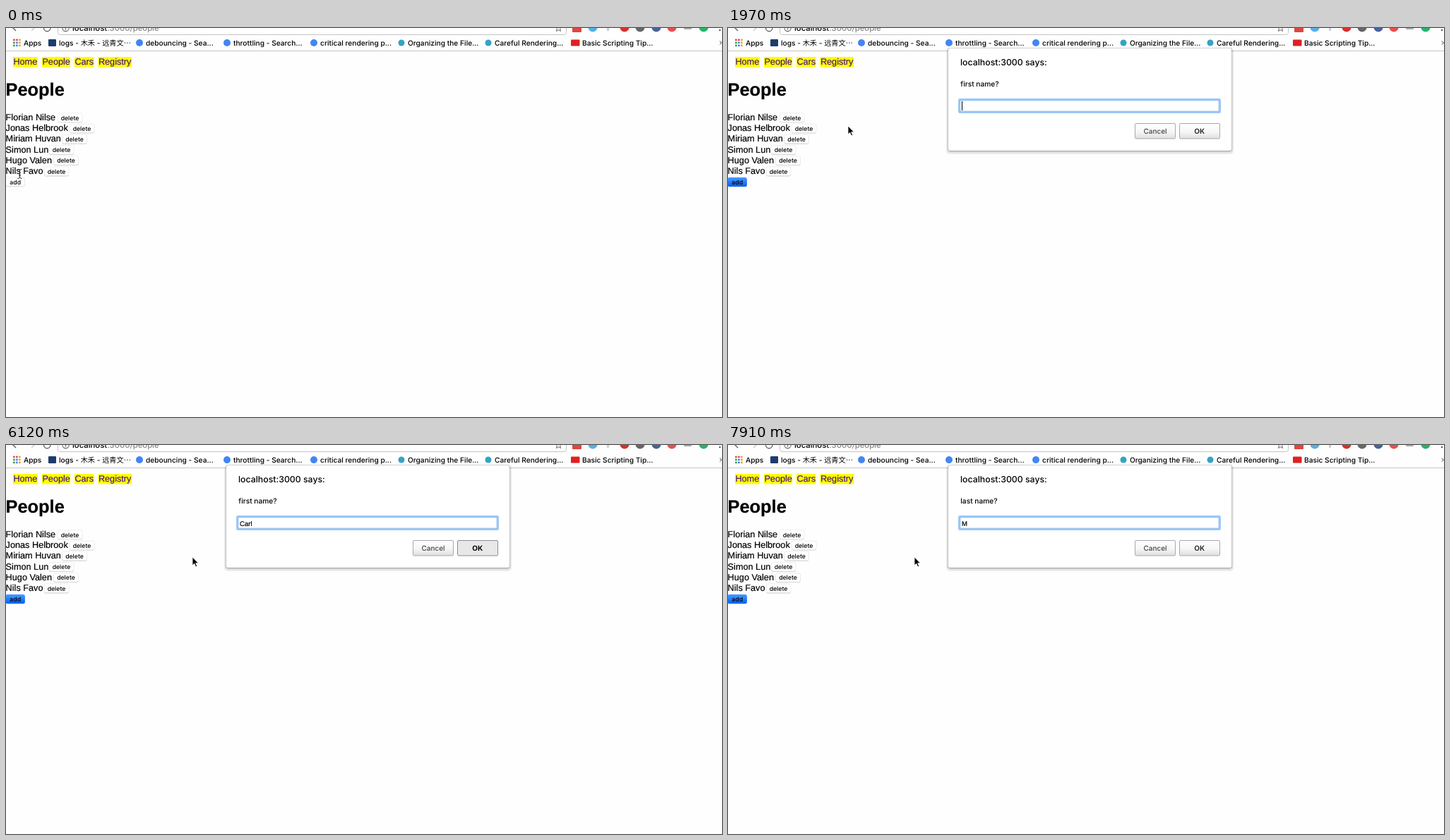
Animation, 1014 px wide and 552 px high, one loop 8 s. Source, as an HTML page:

```html
<!DOCTYPE html>
<html lang="en">
<head>
<meta charset="utf-8">
<title>People</title>
<style>
  html, body { margin: 0; width: 100%; height: 100%; overflow: hidden; background: #fefefe; }
  #stage { position: relative; width: 1014px; height: 552px; overflow: hidden; }
  svg { position: absolute; left: 0; top: 0; display: block; overflow: visible; }
  text {
    font-family: "Liberation Sans", Arial, sans-serif; font-size: 12.7px; white-space: pre;
    stroke: #000; stroke-width: .2px; text-rendering: geometricPrecision;
  }
  .ui {
    font-family: Inter, "Noto Sans CJK SC", "Noto Sans CJK", sans-serif;
    font-size: 10.2px; stroke: none; font-weight: 450;
  }
  .small { font-size: 8.7px; }
  .mid { text-anchor: middle; }
  #nav text { fill: #4a1580; stroke: #4a1580; }
  #dialog {
    position: absolute; left: 312px; top: 29px; width: 401px; height: 145px;
    background: #fff; border-radius: 2px; transform-origin: 50% 100%;
    box-shadow: 0 0 1px rgba(0,0,0,.5), 0 1px 3px rgba(0,0,0,.35), 0 2px 0 3px rgba(0,0,0,.07);
  }
  #dialog .plain { display: none; }
  #dialog.opening {
    background: #fcfcfc; opacity: .95;
    transform: translateY(var(--lift)) perspective(750px) rotateX(6deg) scaleY(1.02);
    box-shadow: 0 0 1px rgba(0,0,0,.4), 0 1px 3px rgba(0,0,0,.3), 0 2px 0 2px rgba(0,0,0,.06);
  }
  .opening .ring { display: none; }
  #dialog.opening .plain { display: inline; }
  .opening text { fill: #303030; }
  .opening .btn text { fill: #777; font-weight: 450; }
  .btn rect { fill: url(#grey); stroke: #a8a8a8; }
  .btn text { font-size: 10px; fill: #444; }
  .btn .ok { font-weight: 700; fill: #333; }
  .pressed rect { fill: #e8e8e8; stroke: #8c8c8c; }
  .pressed .ok { fill: #000; }
  #add.active rect { fill: url(#blue); stroke: none; }
</style>
</head>
<body>
<div id="stage">
  <svg width="1014" height="552">
    <defs>
      <linearGradient id="grey" x2="0" y2="1">
        <stop stop-color="#fff"/><stop offset=".55" stop-color="#f6f6f6"/><stop offset="1" stop-color="#dedede"/>
      </linearGradient>
      <linearGradient id="blue" x2="0" y2="1">
        <stop stop-color="#4a9cff"/><stop offset="1" stop-color="#0a60f2"/>
      </linearGradient>
    </defs>

    <g fill="none" stroke="#666" stroke-width="1.4">
      <path d="M14 4L9 -1"/>
      <path d="M36 4l5-5" stroke="#ccc"/>
      <path d="M53.5 0a4.7 4.7 0 0 0 9.4 0"/>
      <rect x="73.5" y="-14" width="720" height="23.5" rx="3" stroke="#c4c4c4" stroke-width="1"/>
      <circle cx="84.5" cy="0" r="4.6" stroke-width="1.1"/>
      <path d="M84.5 -1v3.5" stroke-width="1.2"/>
      <path d="M779.5 4.5l.8-3.8-2.8-2.7M785.5 4.5l-.8-3.8 2.8-2.7M779.5 4.5l3-1.8 3 1.8" stroke-width="1"/>
    </g>
    <text class="ui" x="94" y="3.5" style="font-size:11.3px">localhost<tspan fill="#888">:3000/people</tspan></text>
    <g id="extensions"></g>
    <g id="bookmarks"></g>
    <path d="M1011 18.5l2.3 2.5-2.3 2.5" fill="none" stroke="#333"/>
    <path d="M0 32.5H1014" stroke="#c6c6c6"/>

    <g id="nav"></g>
    <text x="-.5" y="96" font-weight="700" style="font-size:25.4px">People</text>
    <g id="people"></g>
  </svg>

  <div id="dialog">
    <svg width="401" height="145" viewBox="312 29 401 145">
      <text class="ui" x="329" y="52.5" style="font-size:12.3px">localhost:3000 says:</text>
      <text class="ui" id="question" x="329.3" y="83"></text>
      <rect class="ring" x="327.5" y="101.5" width="369" height="18" rx="1" fill="#fff" stroke="#9cc8f8" stroke-width="3"/>
      <rect class="ring" x="329" y="103" width="366" height="15" fill="none" stroke="#86b4ea" stroke-width=".6"/>
      <rect class="plain" x="328.5" y="102.5" width="367" height="17" fill="#fff" stroke="#dadada"/>
      <text id="typed" x="331" y="114.5" style="font-size:9.6px"></text>
      <rect id="caret" y="104" width="1" height="13"/>
      <g class="btn">
        <rect x="576.5" y="135.5" width="57" height="21.5" rx="1.5"/>
        <text class="ui mid" x="605" y="150.2">Cancel</text>
      </g>
      <g class="btn" id="ok">
        <rect x="639.5" y="135.5" width="57" height="21.5" rx="1.5"/>
        <text class="ui mid ok" x="667.7" y="150.2">OK</text>
      </g>
    </svg>
  </div>

  <svg width="1014" height="552">
    <path id="arrow" d="M0 0V11.8L2.7 9.3L4.7 13.8L6.6 13L4.7 8.7H8.4Z" stroke="#fff" stroke-width=".8"/>
    <path id="beam" d="M-3 -6.5q2.5 0 3 1.5q.5-1.5 3-1.5M0 -5V5M-3 6.5q2.5 0 3-1.5q.5 1.5 3 1.5M-1.5 2H1.5" fill="none" stroke="#222"/>
  </svg>
</div>

<script>
const $ = id => document.getElementById(id);
const fill = (id, items, draw) => { $(id).innerHTML = items.map(draw).join(""); };
const dot = (x, y, r, color) => `<circle cx="${x}" cy="${y}" r="${r}" fill="${color}"/>`;
const square = (x, y, w, h, color) => `<rect x="${x}" y="${y}" width="${w}" height="${h}" rx="1" fill="${color}"/>`;

fill("extensions", [
  [831, "#58aee6"], [876, "#d8302a"], [898, "#666"],
  [921, "#46639f"], [943, "#e84e50"], [988, "#27b36a"]
], ([x, color]) => dot(x, -1, 6.5, color));
$("extensions").innerHTML += square(802, -7, 13, 13, "#df4640") + square(851, -5, 3, 9, "#ccc") +
  square(960, -4, 11, 6, "#aaa") + dot(1011, 3, 1.2, "#555");

const gridColors = ["#e34b3d", "#e34b3d", "#e9a52d", "#35a15a", "#4587e8", "#e9a52d", "#35a15a", "#4587e8", "#e9a52d"];
const grid = gridColors.map((c, i) => square(10 + i % 3 * 4, 15.5 + Math.floor(i / 3) * 4, 2.8, 2.8, c)).join("");
const search = x => dot(x, 21, 5, "#4285f4");
const docs = x => dot(x, 21, 4.5, "#35a3c4");
fill("bookmarks", [
  [25, "Apps", grid],
  [75, "logs - 木禾 - 远青文⋯", square(60, 16, 11, 10, "#1d3c6e")],
  [198, "debouncing - Sea...", search(189)],
  [322, "throttling - Search...", search(313)],
  [445, "critical rendering p...", search(436)],
  [569, "Organizing the File...", docs(560)],
  [692, "Careful Rendering...", docs(683)],
  [816, "Basic Scripting Tip...", square(800, 16.5, 12.5, 9, "#e02020")]
], ([x, label, icon]) => `${icon}<text class="ui" x="${x}" y="24.7">${label}</text>`);

fill("nav", [[10, 35, "Home"], [51, 40, "People"], [97, 27.5, "Cars"], [130.5, 47.5, "Registry"]],
  ([x, w, label]) => `<rect x="${x}" y="41" width="${w}" height="14.5" fill="#ff0"/>
    <text x="${x + .4}" y="52.3">${label}</text>`);

const button = (x, y, w, label, id) => `<g id="${id}">
  <rect x="${x}" y="${y + .8}" width="${w}" height="12.6" rx="2.5" fill="#c9c9c9"/>
  <rect x="${x}" y="${y}" width="${w}" height="12.6" rx="2.5" fill="#fff" stroke="#e6e6e6" stroke-width=".7"/>
  <text class="ui small mid" x="${x + w / 2}" y="${y + 9.7}">${label}</text></g>`;

fill("people", [
  ["Florian Nilse", 73], ["Jonas Helbrook", 90], ["Miriam Huvan", 79.5],
  ["Simon Lun", 61], ["Hugo Valen", 67.5], ["Nils Favo", 54]
], ([name, x], i) => {
  const y = 120.8 + i * 15.24;
  return `<text x="-.4" y="${y + 10}">${name}</text>` + button(x, y, 35, "delete", "delete" + i);
});
$("people").innerHTML += button(-.3, 211.9, 27, "add", "add");

// Each track holds [start time in ms, value...]; the latest started entry applies.
const pointer = [
  [0, 19.5, 207], [150, 66, 207], [930, 52, 221], [1080, 36, 226], [1230, 21, 223],
  [1380, 13.5, 219], [1830, 34, 200], [1970, 170, 139], [2120, 245, 156], [2260, 264, 159]
];
const dialogs = [
  [0, "hidden"], [1830, "opening", "first", -4], [1970, "open", "first"],
  [6270, "hidden"], [6570, "opening", "last", -4.5], [6710, "open", "last"]
];
const typing = [
  [0, "", false], [1970, "", true], [2260, "", false], [2860, "", true],
  [3310, "K", true], [3610, "Ka", true], [3750, "Kay", true], [4350, "Kay", false],
  [4500, "Ka", true], [4950, "K", true], [5090, "", true],
  [5390, "C", true], [5540, "Ca", true], [5680, "Carl", true], [6120, "Carl", false],
  [6270, "", false], [6710, "", true], [7160, "", false], [7310, "M", true], [7910, "M", false]
];
const at = (track, t) => track.findLast(entry => entry[0] <= t).slice(1);

function render(t) {
  const [x, y] = at(pointer, t);
  const overText = t < 150;
  $("beam").style.display = overText ? "" : "none";
  $("arrow").style.display = overText ? "none" : "";
  for (const id of ["beam", "arrow"]) $(id).setAttribute("transform", `translate(${x} ${y})`);

  const [state, which, lift = 0] = at(dialogs, t);
  $("dialog").style.display = state === "hidden" ? "none" : "";
  $("dialog").className = state;
  $("dialog").style.setProperty("--lift", lift + "px");
  $("question").textContent = which ? which + " name?" : "";

  const [text, caretOn] = at(typing, t);
  $("typed").textContent = text;
  const width = text ? $("typed").getComputedTextLength() : 0;
  $("caret").setAttribute("x", Math.round(331 + width));
  $("caret").style.display = caretOn ? "" : "none";

  $("ok").classList.toggle("pressed", t >= 6120 && t < 6270);
  $("add").classList.toggle("active", t >= 1680);
}

const start = performance.now();
function tick() {
  render((performance.now() - start) % 8000);
  requestAnimationFrame(tick);
}
tick();
</script>
</body>
</html>
```
